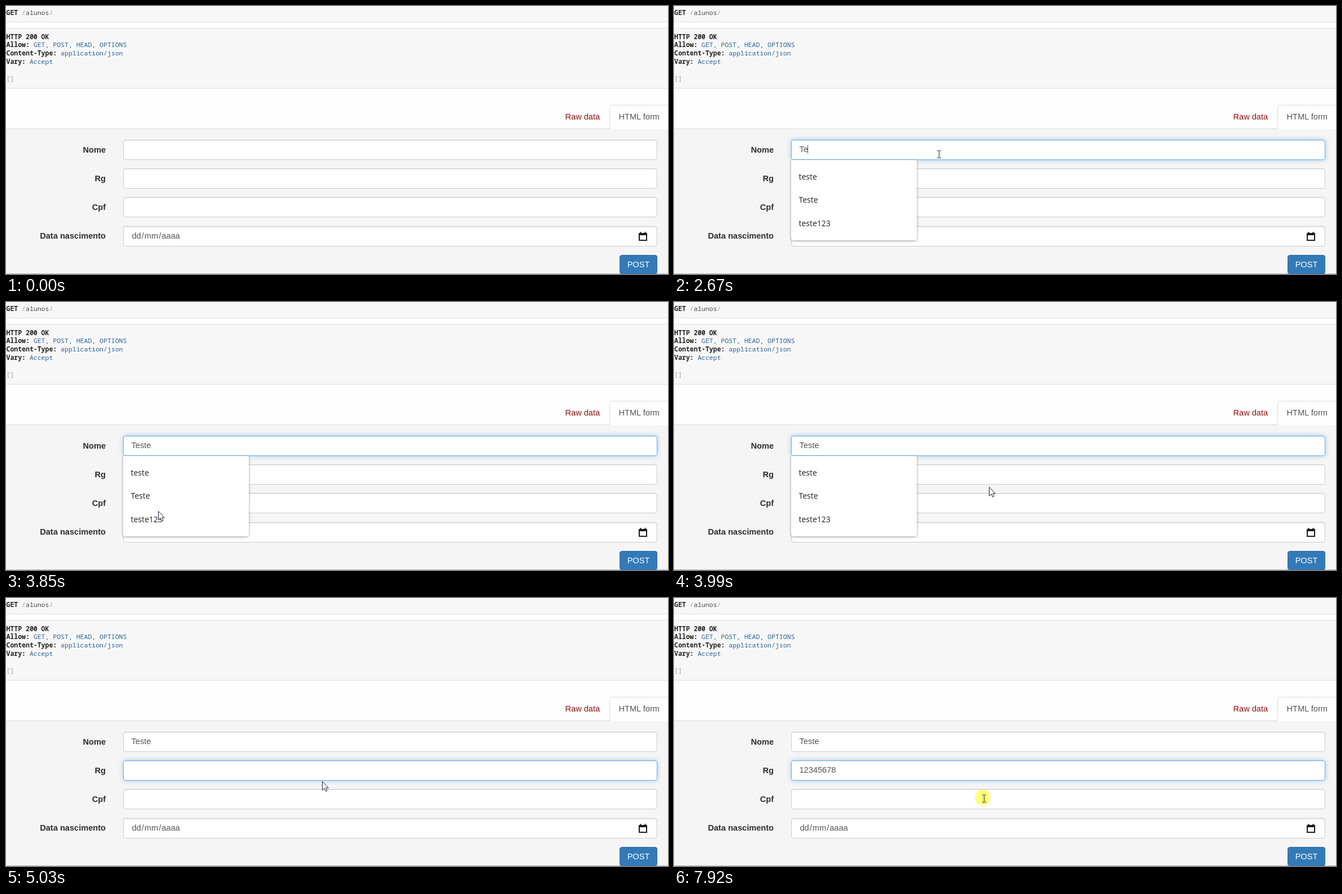
Recreate the animation shown at these times as an HTML page. Size 1175 by 477 pixels, loop 7.99 s.

```html
<!DOCTYPE html>
<html lang="pt">
<head>
<meta charset="utf-8">
<title>Alunos</title>
<style>
html, body { margin: 0; width: 100%; height: 100%; overflow: hidden; background: #fefefe; }
body { position: relative; font: 14.6px/36px "Liberation Sans", Arial, sans-serif; color: #555; }
div, pre, svg { position: absolute; box-sizing: border-box; margin: 0; white-space: pre; }
pre { left: 0; width: 1175px; padding: 7.6px 0 0 .5px; background: #f7f7f7; border: solid #e1e1e1; border-width: 1px 0;
  font: 11.5px/14.8px "Noto Sans Mono", "DejaVu Sans Mono", monospace; color: #48484c; }
pre b { color: #222; }
pre i { font-style: normal; color: #2f6393; }
pre s { text-decoration: none; color: #93a1a1; }
#form { left: 0; top: 218px; width: 1175px; height: 259px; background: #f5f5f5; border-top: 1px solid #ddd; }
#tab { left: 1071px; top: 176px; width: 110px; height: 43px; padding-left: 15.5px; line-height: 40px;
  background: #fefefe; border: 1px solid #ddd; border-bottom: 0; border-radius: 4px 4px 0 0; }
#raw { left: 992.5px; top: 177px; line-height: 40px; color: #8c1014; }
.label { right: 998px; color: #2e2e2e; font-weight: bold; }
.field { left: 208px; width: 948px; height: 36px; padding-left: 13.5px; line-height: 33px; background: #fff;
  border: 1px solid #ccc; border-radius: 4px; box-shadow: inset 0 1px 1px rgba(0,0,0,.075); }
.field.focus { border-color: #66afe9; box-shadow: inset 0 1px 1px rgba(0,0,0,.075), 0 0 8px rgba(102,175,233,.6); }
.field.preview { background: #e8f0fe; font-size: 13.9px; color: #222; }
.field span { padding: 0 1px; }
#line { left: 0; top: 476px; width: 1175px; height: 1px; background: #b8b8b8; }
#post { left: 1089px; top: 443px; width: 67px; height: 34px; line-height: 32px; text-align: center; color: #fff;
  background: #337ab7; border: 1px solid #2e6da4; border-radius: 4px; }
#caret { width: 1px; height: 15px; background: #555; }
#list { left: 208px; width: 223px; padding: 8.6px 0 10px; background: #fff; border-radius: 3px 3px 4px 4px;
  box-shadow: 0 1px 4px rgba(0,0,0,.4);
  font: 500 14px/41.6px "Open Sans", "Noto Sans", sans-serif; color: #202124; }
#list div { position: static; width: 221.5px; height: 41.6px; padding-left: 13.5px; }
#list .on { background: #c7c7c9; }
#pointer { left: 0; top: 0; width: 1175px; height: 477px; }
</style>
</head>
<body>
<pre style="top:-4px;height:33px"><b>GET</b> <s>/</s>alunos<s>/</s></pre>
<pre style="top:39px;height:108px"><b>HTTP 200 OK
Allow:</b> <i>GET, POST, HEAD, OPTIONS</i>
<b>Content-Type:</b> <i>application/json</i>
<b>Vary:</b> <i>Accept</i>

<s>[]</s></pre>
<div id="raw">Raw data</div>
<div id="form"></div>
<div id="tab">HTML form</div>
<div id="caret"></div>
<div id="list"></div>
<div id="line"></div>
<div id="post">POST</div>
<svg id="pointer">
  <circle id="press" r="14" fill="#ffff00" fill-opacity=".5"/>
  <path id="arrow" d="M.5.5V16L4 12.6 6.5 18 9 17 6.7 11.8H11.3Z" fill="#fff" stroke="#1c1c2c"/>
  <path id="beam" d="M-3-6.5h3M1-6.5h3M-3 6.5h3M1 6.5h3M.5-6V6" fill="none" stroke="#222"/>
</svg>
<script>
const LOOP = 7990, ROW = 41.6;
const $ = id => document.getElementById(id);
const tops = [238, 289, 340, 391.5];

const fields = ['Nome', 'Rg', 'Cpf', 'Data nascimento'].map((name, i) => {
  const add = (cls, text, y) => {
    const el = document.createElement('div');
    el.className = cls;
    el.textContent = text;
    el.style.top = y + 'px';
    return document.body.insertBefore(el, $('caret'));
  };
  add('label', name, tops[i] - .5);
  return add('field', '', tops[i]);
});
fields[3].innerHTML = '<span>dd</span>/<span>mm</span>/<span>aaaa</span>' +
  '<svg style="left:914px;top:9px" width="16" height="17"><path d="M1 3h13v12H1zM1 5h13M3.5 3V0M11.5 3V0" ' +
  'fill="none" stroke="#1a1a1a" stroke-width="2"/></svg>';

const saved = ['Fabiano Tavela Morbano', 'Sônia Tavela', 'teste', 'Caio', 'Teste'];
const tests = ['teste', 'Teste', 'teste123'];
const keys = [[2520, 2670, 2830, 2980, 3130], [5430, 5580, 5810, 6060, 6310, 6460, 6770, 6920]];
const carets = [[1170, 1720], [2300, 3550], [4560, 5030], [5430, 7380]];
const presses = [[1170, 1420], [4560, 4730], [7920, LOOP]];

// Pointer positions [time, x, y], each held until the next
const track = [];
for (let i = 0; i < 9; i++) {
  const rest = (1 - i / 8) ** 2;
  track.push([400 + 77.5 * i, 470 + 507 * rest, 264 + 201 * rest]);
}
track.push([3550, 262, 348], [3610, 143, 350], [3680, 132, 356], [3760, 150, 370], [3840, 270, 372],
  [3910, 440, 352], [3990, 559, 329], [4070, 562, 331], [4150, 561, 333], [4230, 560, 331],
  [4400, 560, 326], [4480, 561, 319], [4560, 561, 316], [4810, 561, 321], [4890, 561, 326],
  [7450, 561, 324], [7530, 561, 323], [7780, 556, 342], [7850, 550, 357]);

const within = (spans, t) => spans.some(([a, b]) => t >= a && t < b);
const typed = (text, times, t) => text.slice(0, times.filter(k => k <= t).length);
const show = (el, on) => el.style.display = on ? '' : 'none';

function suggestions(t) {
  if (t >= 1250 && t < 4560) return t < 2520 ? saved : tests;
  return t >= 5430 && t < 5580 ? ['11111111', '1111'] : [];
}

function draw(t) {
  const focus = t < 1170 ? -1 : t < 4560 ? 0 : 1;
  const items = suggestions(t);
  const listTop = focus === 1 ? 325 : 274;
  const at = track.filter(p => p[0] <= t).length - 1;

  // Row highlight trails the pointer by one step
  let hover = -1;
  if (at > 0 && items.length) {
    const [, x, y] = track[at - 1];
    if (x > 208 && x < 431) hover = Math.floor((y - listTop - 8.6) / ROW);
  }
  const preview = items[hover];

  fields[0].textContent = preview || typed('Teste', keys[0], t);
  fields[1].textContent = typed('12345678', keys[1], t);
  fields.forEach((f, i) => {
    f.classList.toggle('focus', i === focus);
    f.classList.toggle('preview', i === 0 && !!preview);
  });

  const caret = $('caret');
  show(caret, within(carets, t));
  if (focus >= 0) {
    const range = document.createRange();
    range.selectNodeContents(fields[focus]);
    caret.style.left = Math.round(222 + range.getBoundingClientRect().width - .4) + 'px';
    caret.style.top = tops[focus] + 10 + 'px';
  }

  const list = $('list');
  show(list, items.length);
  list.style.top = listTop + 'px';
  list.style.height = t < 2670 ? '230px' : 'auto';
  list.innerHTML = items.map((s, i) => `<div${i === hover ? ' class="on"' : ''}>${s}</div>`).join('');

  show($('pointer'), at >= 0);
  if (at >= 0) {
    const [, x, y] = track[at];
    const overList = items.length && x > 208 && x < 431 && y > listTop;
    const overField = !overList && x > 208 && x < 1156 && tops.some(top => y >= top && y < top + 36);
    show($('arrow'), !overField);
    show($('beam'), overField);
    show($('press'), within(presses, t));
    const place = (id, dx, dy) => $(id).setAttribute('transform', `translate(${Math.round(x) + dx} ${Math.round(y) + dy})`);
    place('arrow', 0, 0);
    place('beam', 0, 0);
    place('press', -2, -2);
  }
}

function tick() {
  draw(performance.now() % LOOP);
  requestAnimationFrame(tick);
}
tick();
</script>
</body>
</html>
```
